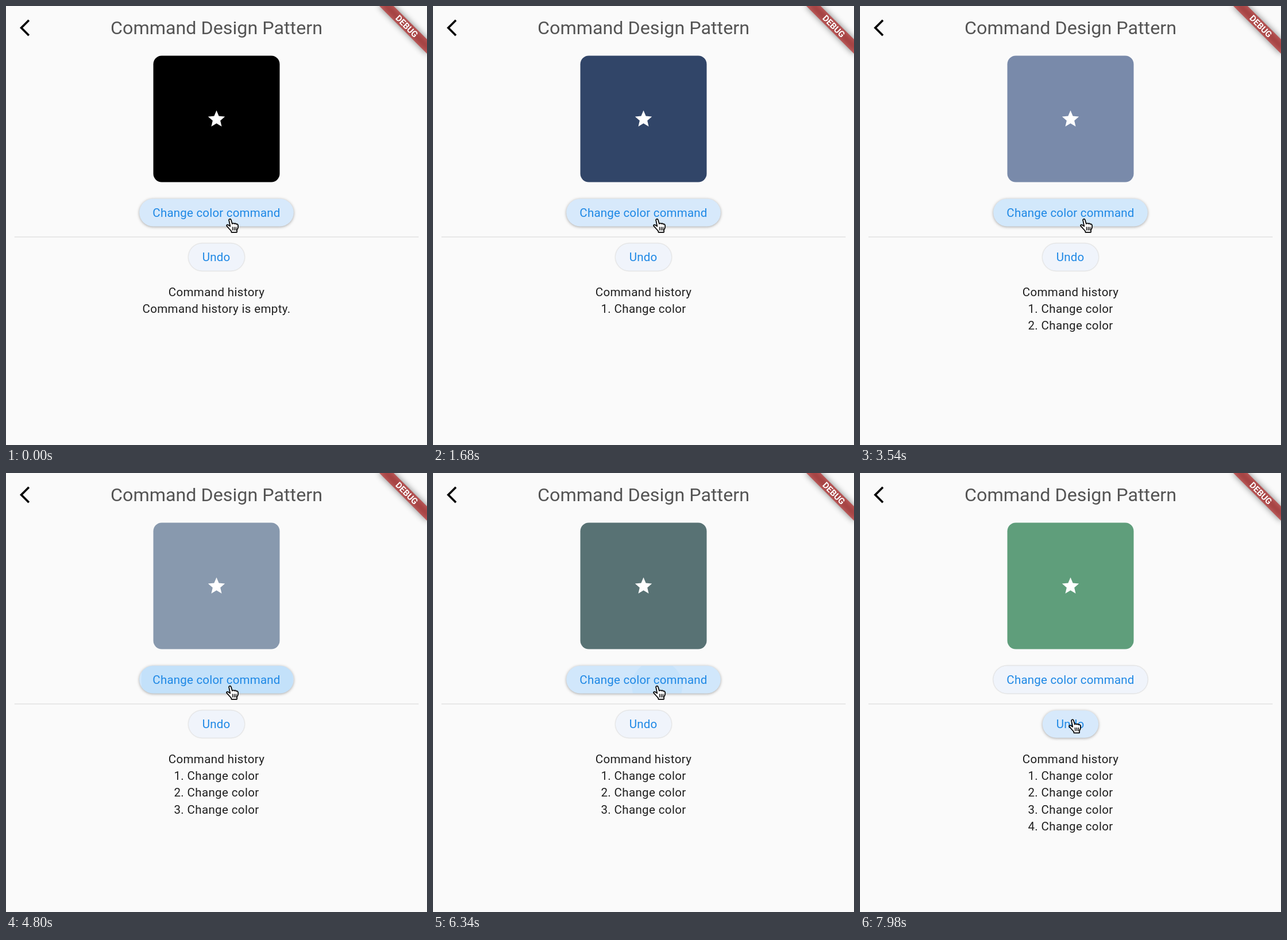
Animation of 733x764 px, one loop 8000 ms. Source, as an HTML page:

```html
<!DOCTYPE html>
<html lang="en">
<head>
<meta charset="utf-8">
<title>Command Design Pattern</title>
<style>
  html, body { margin: 0; width: 100%; height: 100%; overflow: hidden; background: #fafafa; }
  svg { display: block; width: 100vw; height: 100vh; }
  text { font-family: Roboto, sans-serif; font-size: 20.53px; text-anchor: middle; }
  .title { font-size: 32.27px; fill: #545454; }
  .body { fill: #1f1f1f; letter-spacing: .367px; }
  .label { fill: #1e88e5; letter-spacing: .2px; }
  .base { fill: #f0f4fb; }
  .ink { fill: #2196f3; }
  .debug { font-size: 14.96px; font-weight: 700; fill: #fff; }
</style>
</head>
<body>
<svg viewBox="0 0 733 764" xmlns="http://www.w3.org/2000/svg">
  <defs>
    <clipPath id="pill"><rect x="232.2" y="335.5" width="268.6" height="48" rx="24"/></clipPath>
    <filter id="blur" x="-50%" y="-200%" width="200%" height="500%"><feGaussianBlur stdDeviation="5.8"/></filter>
  </defs>
  <rect width="733" height="764" fill="#fafafa"/>
  <path d="M11.67 3.87 9.9 2.1 0 12l9.9 9.9 1.77-1.77L3.54 12z" transform="translate(24 20.4) scale(1.467)"/>
  <text class="title" x="366.5" y="48.5">Command Design Pattern</text>

  <rect id="box" x="256.5" y="86.5" width="220" height="220" rx="14.67"/>
  <path d="M12 17.27 18.18 21l-1.64-7.03L22 9.24l-7.19-.61L12 2 9.19 8.63 2 9.24l5.46 4.73L5.82 21z"
        transform="translate(348.9 178.9) scale(1.467)" fill="#fff"/>

  <rect id="base1" class="base" x="232.2" y="335.5" width="268.6" height="48" rx="24"/>
  <g clip-path="url(#pill)">
    <rect id="hover1" class="ink" x="232" y="335" width="270" height="49"/>
    <rect id="press" class="ink" x="232" y="335" width="270" height="49"/>
    <circle id="ripple" class="ink"/>
  </g>
  <text class="label" x="366.5" y="366.7">Change color command</text>

  <rect x="14.7" y="401.2" width="703.7" height="1.47" fill="#e1e1e1"/>

  <rect id="base2" class="base" x="317.8" y="413.2" width="97.4" height="47.6" rx="23.8"/>
  <rect id="hover2" class="ink" x="317.8" y="413.2" width="97.4" height="47.6" rx="23.8"/>
  <text class="label" x="366" y="444.4">Undo</text>

  <text class="body" x="366.5" y="504.6">Command history</text>
  <g id="history"></g>

  <g transform="translate(733 0) rotate(45)">
    <rect x="-58.7" y="41.1" width="117.4" height="17.6" fill="#000" opacity=".5" filter="url(#blur)"/>
    <rect x="-58.7" y="41.1" width="117.4" height="17.6" fill="#b71c1c" opacity=".627"/>
    <text class="debug" x="0" y="55.1">DEBUG</text>
  </g>

  <g id="cursor" stroke="#000" stroke-linecap="round" stroke-linejoin="round">
    <path fill="#fff" stroke-width="1.7" d="M5.2 3.2C4.6.6 8 0 8.9 2.4L11 9.4C11.5 7.8 14 7.9 14.4 9.3C15.2 8.1 17.3 8.5 17.7 10C18.6 9.2 20.6 9.7 21 11.6C21.5 14 21 17 19.2 20L19 24H9.5L9 21.5C7 19.5 4 16 1.5 13.4C.2 11.4 2.2 10 4.2 11.4L7.3 13.6Z"/>
    <path fill="none" stroke-width="1.4" d="M11.4 15.2l.4 5M14.4 15.2l.2 5M17.4 15.2l-.1 5"/>
  </g>
</svg>
<script>
const LOOP = 8000;
const FRAME = 1000 / 60;
const RADIUS = 136.5;
const TOUCH = [391, 371];
const CENTER = [366.5, 359.5];

// Press and release in sixtieths of a second, and the colour picked
const taps = [
  { down: 2, up: 11, color: [59, 83, 125] },
  { down: 45, up: 57, color: [152, 166, 193] },
  { down: 86, up: 96.5, color: [88, 114, 116] },
  { down: 134, up: 146, color: [96, 167, 124] },
];
const LEAVE = 160, ENTER = 163, MOVE = [156, 166];

const $ = id => document.getElementById(id);
const clamp = v => Math.max(0, Math.min(1, v));
const lerp = (a, b, k) => a + (b - a) * k;
const attrs = (el, map) => Object.entries(map).forEach(([k, v]) => el.setAttribute(k, v));

const lines = taps.map((_, i) => {
  const el = document.createElementNS('http://www.w3.org/2000/svg', 'text');
  attrs(el, { class: 'body', x: 366.5, y: 533.9 + i * 29.33 });
  $('history').append(el);
  return el;
});

// cubic-bezier(.25, .1, .25, 1)
function ease(x) {
  let lo = 0, hi = 1;
  const curve = (s, a, b) => 3 * s * (1 - s) * (1 - s) * a + 3 * s * s * (1 - s) * b + s ** 3;
  for (let i = 0; i < 20; i++) {
    const mid = (lo + hi) / 2;
    if (curve(mid, .25, .25) < x) lo = mid; else hi = mid;
  }
  return curve(lo, .1, 1);
}

// Uneven playback: three steps per 140 ms, held for 20, 20 and 100 ms
function stepAt(t) {
  const u = t % 140;
  return Math.floor(t / 140) * 3 + (u < 20 ? 0 : u < 40 ? 1 : 2);
}

function drawBox(n) {
  let color = [0, 0, 0];
  for (const tap of taps) {
    const k = clamp((n - tap.up) * FRAME / 500);
    color = color.map((c, i) => lerp(c, tap.color[i], k));
  }
  $('box').setAttribute('fill', `rgb(${color.map(Math.round)})`);
}

function drawHistory(n) {
  const count = taps.filter(tap => n >= tap.up).length;
  lines.forEach((el, i) => {
    el.textContent = i < count ? `${i + 1}. Change color`
      : i === 0 ? 'Command history is empty.' : '';
  });
}

function drawInk(n) {
  const tap = taps.filter(p => n >= p.down).pop();
  if (!tap) {
    $('press').setAttribute('opacity', 0);
    $('ripple').setAttribute('opacity', 0);
    return;
  }
  const held = (Math.min(n, tap.up) - tap.down) * FRAME;
  const after = Math.max(0, n - tap.up) * FRAME;
  const grow = ease(clamp(held / 1000 + after / 225));
  const fade = clamp((held + after) / 75) * (1 - clamp((after - 225) / 150));
  $('press').setAttribute('opacity', .12 * clamp(clamp(held / 200) - after / 200));
  attrs($('ripple'), {
    cx: lerp(TOUCH[0], CENTER[0], grow),
    cy: lerp(TOUCH[1], CENTER[1], grow),
    r: RADIUS * lerp(.3, 1, grow),
    opacity: .078 * fade,
  });
}

function drawButton(i, tint, lift) {
  $('hover' + i).setAttribute('opacity', .116 * tint);
  $('base' + i).style.filter =
    `drop-shadow(0 ${lerp(.8, 1.6, lift)}px ${lerp(1.1, 2.4, lift)}px rgba(0,0,0,${lerp(.26, .34, lift)}))`;
}

function drawPointer(n) {
  const out = (n - LEAVE) * FRAME, into = (n - ENTER) * FRAME;
  drawButton(1, 1 - clamp(out / 50), 1 - clamp(out / 200));
  drawButton(2, clamp(into / 50), clamp(into / 130));
  const k = clamp((n - MOVE[0]) / (MOVE[1] - MOVE[0]));
  const m = k * k * (3 - 2 * k);
  $('cursor').setAttribute('transform', `translate(${lerp(383, 363, m)} ${lerp(369.8, 428.3, m)})`);
}

function draw(t) {
  const n = stepAt(t);
  drawBox(n);
  drawHistory(n);
  drawInk(n);
  drawPointer(n);
}

const start = performance.now();
function tick() {
  draw((performance.now() - start) % LOOP);
  requestAnimationFrame(tick);
}
draw(0);
requestAnimationFrame(tick);
</script>
</body>
</html>
```
